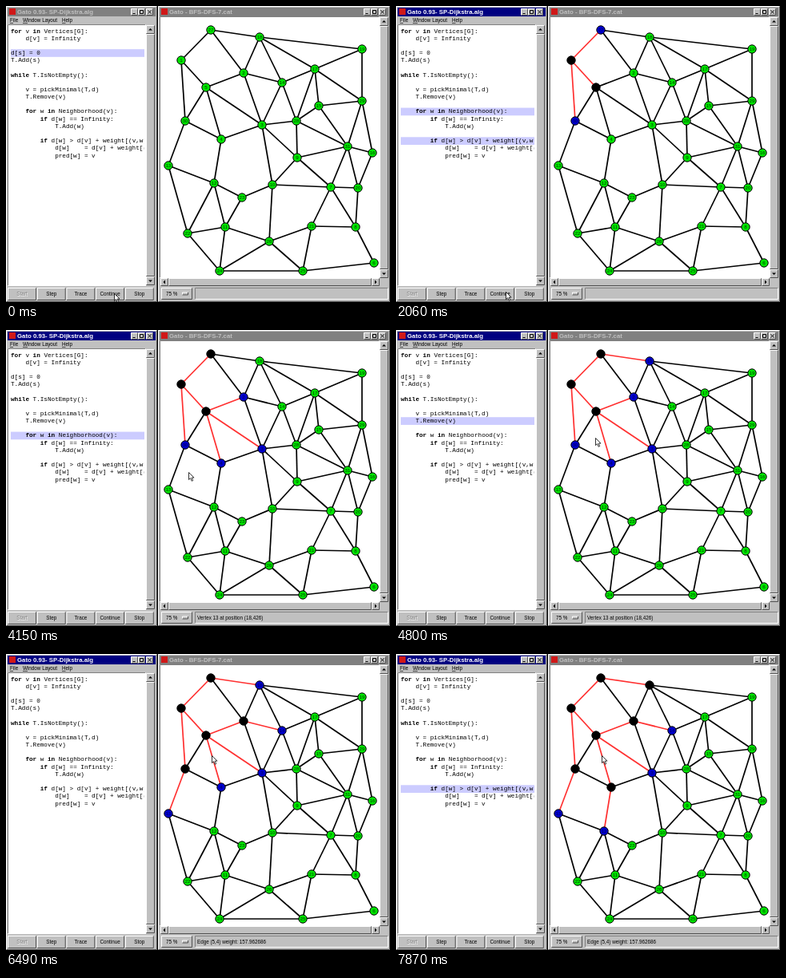
An HTML page for the animation above (8 s loop, 480x371 px).

```html
<!DOCTYPE html>
<html lang="en">
<head>
<meta charset="utf-8">
<title>Shortest paths</title>
<style>
html, body { margin: 0; width: 480px; height: 371px; overflow: hidden; background: #000; }
svg { display: block; }
text { white-space: pre; }
.ui { font: 6.3px "Liberation Sans", Arial, sans-serif; }
.title { font: bold 7.8px "Liberation Sans", Arial, sans-serif; }
.code { font: 7.67px "Liberation Mono", "Courier New", monospace; }
.code tspan { font-weight: bold; }
.label { font: 6.2px "Liberation Sans", Arial, sans-serif; text-anchor: middle; }
.mid { text-anchor: middle; }
</style>
</head>
<body>
<svg id="stage" width="480" height="371" viewBox="0 0 480 371"></svg>
<script>
const LOOP = 8000;
const GRAY = '#c0c0c0', DARK = '#808080', NAVY = '#000080';
const COLORS = {
  green: ['#00e400', '#003c00'],
  blue: ['#0000cd', '#000060'],
  black: ['#000', '#000']
};

const code = [
  'for v in Vertices[G]:',
  '    d[v] = Infinity',
  '',
  'd[s] = 0',
  'T.Add(s)',
  '',
  'while T.IsNotEmpty():',
  '',
  '    v = pickMinimal(T,d)',
  '    T.Remove(v)',
  '',
  '    for w in Neighborhood(v):',
  '        if d[w] == Infinity:',
  '            T.Add(w)',
  '',
  '        if d[w] > d[v] + weight[(v,w)]:',
  '            d[w]    = d[v] + weight[(v,w)]',
  '            pred[w] = v'
];
const lineTop = i => 26.6 + 9.18 * i;

// Vertex positions, numbered from 1
const vertices = [
  [219, 68], [297, 84], [320, 149], [269, 167], [250, 102], [460, 322], [406, 227], [437, 277],
  [364, 190], [333, 224], [274, 277], [260, 222], [203, 200], [345, 96], [391, 125], [458, 184],
  [386, 79], [317, 39], [445, 54], [440, 228], [382, 276], [227, 285], [295, 240], [267, 332],
  [371, 332], [329, 295], [256, 30], [363, 144], [445, 119], [224, 144], [427, 176]
];
const neighbors = {
  1: [5, 30], 2: [5, 14, 3], 3: [28, 4, 9, 10], 4: [12], 5: [30, 3, 4], 7: [20, 21, 8], 8: [6],
  9: [7, 10], 10: [7, 23, 26], 11: [22, 24, 26], 12: [23, 11, 22], 13: [12, 22], 14: [3, 28],
  15: [28, 31], 16: [20], 17: [14, 29, 28, 15], 18: [19, 17, 14, 2], 19: [17, 29], 20: [8],
  21: [8, 25], 22: [24], 23: [11], 24: [25], 25: [6], 26: [21, 24, 25], 27: [18, 1, 2],
  28: [31, 9], 29: [15, 16, 31], 30: [4, 13], 31: [9, 16, 7, 20]
};

// Each step changes only what it names; the rest carries over
const steps = [
  { at: 0, lines: [3], cursor: [135, 360], active: false, status: '' },
  { at: 100, active: true },
  { at: 720, lines: [11], black: 1 },
  { at: 1380, lines: [15], blue: 27, red: '1-27' },
  { at: 1730, lines: [16], blue: 5, red: '1-5' },
  { at: 2060, lines: [11, 15], blue: 30, black: 5, red: '1-30', cursor: [137, 358] },
  { at: 2440, lines: [15], cursor: [150, 345] },
  { at: 2780, blue: 2, red: '2-5', cursor: [163, 316] },
  { at: 3130, lines: [11], blue: 3, red: '3-5', cursor: [173, 284] },
  { at: 3460, lines: [15], cursor: [187, 240] },
  { at: 3770, lines: [11], blue: 4, red: '4-5', cursor: [203, 197],
    status: 'Vertex 13 at position (18,426)' },
  { at: 4150, black: 27, cursor: [228, 178] },
  { at: 4440, lines: [15], blue: 18, red: '18-27', cursor: [243, 155] },
  { at: 4800, lines: [9], cursor: [249, 135] },
  { at: 5140, lines: [15], black: 30, cursor: [255, 130] },
  { at: 5450, lines: [16] },
  { at: 5800, lines: [11], black: 2, blue: 13, red: '13-30' },
  { at: 6160, cursor: [257, 127], status: 'Edge (5,4) weight: 157.962686' },
  { at: 6490, lines: [], blue: 14, red: '2-14' },
  { at: 6830, lines: [15], black: 4 },
  { at: 7140, lines: [13] },
  { at: 7500, lines: [11], black: 18, blue: 12, red: '4-12' },
  { at: 7870, lines: [15] }
];

const rect = (x, y, w, h, fill, extra = '') =>
  `<rect x="${x}" y="${y}" width="${w}" height="${h}" fill="${fill}" ${extra}/>`;
const path = (d, stroke, width = 1, fill = 'none') =>
  `<path d="${d}" stroke="${stroke}" stroke-width="${width}" fill="${fill}"/>`;
const text = (x, y, s, cls = 'ui', fill = '#000', extra = '') =>
  `<text x="${x}" y="${y}" class="${cls}" fill="${fill}" ${extra}>${s}</text>`;

function bevel(x, y, w, h, light = '#fff', dark = '#505050', fill = GRAY) {
  const r = x + w - .5, b = y + h - .5, l = x + .5, t = y + .5;
  return rect(x, y, w, h, fill) +
    path(`M${l} ${b}V${t}H${r}`, light) + path(`M${l} ${b}H${r}V${t}`, dark);
}
const sunken = (x, y, w, h, fill) => bevel(x, y, w, h, DARK, '#fff', fill);

function arrow(cx, cy, dx, dy) {
  const tip = `${cx + dx * 1.5} ${cy + dy * 1.5}`;
  const a = `${cx - dx + dy * 2.5} ${cy - dy + dx * 2.5}`;
  const b = `${cx - dx - dy * 2.5} ${cy - dy - dx * 2.5}`;
  return path(`M${tip}L${a}L${b}Z`, 'none', 0, '#000');
}

function scrollbar(x, y, w, h) {
  const tall = h > w, s = tall ? w : h;
  const ends = tall ? [[x, y, 0, -1], [x, y + h - s, 0, 1]] : [[x, y, -1, 0], [x + w - s, y, 1, 0]];
  const thumb = tall ? bevel(x, y + s, w, h - 2 * s) : bevel(x + s, y, w - 2 * s, h);
  return thumb + ends.map(([ex, ey, dx, dy]) =>
    bevel(ex, ey, s, s) + arrow(ex + s / 2, ey + s / 2, dx, dy)).join('');
}

function titleBar(x, w, label, id) {
  const buttons = [
    [w - 31, 'M2.5 6.5H5.5'], [w - 22, 'M2.5 2.5H6.5V6.5H2.5Z'], [w - 12, 'M2.5 2.5L6.5 6.5M6.5 2.5L2.5 6.5']
  ];
  return rect(x, 2, w, 11, DARK, `id="${id}Bar"`) +
    rect(x + 2, 3, 8, 8, '#d01818') +
    text(x + 12, 10, label, 'title', GRAY, `id="${id}Title"`) +
    buttons.map(([bx, d]) => bevel(x + bx, 3, 9, 9) +
      `<g transform="translate(${x + bx} 3)">${path(d, '#000')}</g>`).join('');
}

function menu(x, label, underline) {
  return text(x, 20, label) + path(`M${x} 21.5h${underline}`, '#000', .6);
}

function button(x, w, label, off) {
  const cx = x + w / 2;
  return bevel(x, 353, w, 16) +
    (off ? text(cx + .7, 363.9, label, 'ui mid', '#fff') : '') +
    text(cx, 363.2, label, 'ui mid', off ? DARK : '#000');
}

function codeLine(s, i) {
  const marked = s.replace(/\b(for|in|while|if)\b/g, '<tspan>$1</tspan>');
  return text(6, lineTop(i) + 6.9, marked, 'code');
}

function codeWindow() {
  const labels = ['Start', 'Step', 'Trace', 'Continue', 'Stop'];
  return bevel(0, 0, 189, 371) + titleBar(2, 185, 'Gato 0.93- SP-Dijkstra.alg', 'code') +
    menu(5, 'File', 4) + menu(21, 'Window Layout', 6) + menu(70, 'Help', 4.5) +
    sunken(2, 23, 173, 328, '#fff') + scrollbar(175, 24, 11, 326) +
    '<g clip-path="url(#page)">' +
    code.map((_, i) => rect(6, lineTop(i), 167, 9.7, '#ccccff', `id="line${i}"`)).join('') +
    code.map(codeLine).join('') + '</g>' +
    labels.map((s, i) => button(2 + i * 36.7, 36, s, i === 0)).join('');
}

function edge(a, b) {
  const [x1, y1] = vertices[a - 1], [x2, y2] = vertices[b - 1];
  const id = `e${Math.min(a, b)}-${Math.max(a, b)}`;
  return `<path id="${id}" d="M${x1} ${y1}L${x2} ${y2}" stroke-width="1.7"/>`;
}

function vertex([x, y], i) {
  return `<g id="v${i + 1}"><circle cx="${x}" cy="${y}" r="5.2" stroke="#000" stroke-width="1"/>` +
    text(x, y + 2.2, i + 1, 'label') + '</g>';
}

function graphWindow() {
  const edges = Object.entries(neighbors).flatMap(([a, list]) => list.map(b => edge(+a, b)));
  return bevel(190, 0, 290, 371) + titleBar(192, 286, 'Gato - BFS-DFS-7.cat', 'graph') +
    sunken(192, 13, 275, 328, '#fff') + scrollbar(467, 14, 11, 327) + scrollbar(193, 341, 274, 10) +
    bevel(194, 353, 39, 15) + text(200, 362.6, '75 %') + bevel(220, 358.5, 8, 4) +
    sunken(236, 353, 242, 15, GRAY) + text(239, 362.6, '', 'ui', '#000', 'id="status"') +
    edges.join('') + vertices.map(vertex).join('');
}

const stage = document.getElementById('stage');
stage.innerHTML = '<clipPath id="page"><rect x="3" y="24" width="170" height="326"/></clipPath>' +
  codeWindow() + graphWindow() +
  `<g id="cursor">${path('M.5 .5V9.6L2.6 7.7L4.2 11.3L5.7 10.6L4.2 7.1H7Z', '#000', .8, '#fff')}</g>`;

const $ = id => document.getElementById(id);

function stateAt(t) {
  const state = { colors: {}, red: new Set() };
  for (const { red, blue, black, ...rest } of steps.filter(s => s.at <= t)) {
    Object.assign(state, rest);
    if (red) state.red.add('e' + red);
    if (blue) state.colors[blue] = 'blue';
    if (black) state.colors[black] = 'black';
  }
  return state;
}

function draw(state) {
  code.forEach((_, i) => $('line' + i).setAttribute('visibility', state.lines.includes(i) ? 'visible' : 'hidden'));
  vertices.forEach((_, i) => {
    const [fill, ink] = COLORS[state.colors[i + 1] || 'green'];
    const [disc, label] = $('v' + (i + 1)).children;
    disc.setAttribute('fill', fill);
    label.setAttribute('fill', ink);
  });
  stage.querySelectorAll('path[id^=e]').forEach(p =>
    p.setAttribute('stroke', state.red.has(p.id) ? '#ff3030' : '#000'));
  $('codeBar').setAttribute('fill', state.active ? NAVY : DARK);
  $('codeTitle').setAttribute('fill', state.active ? '#fff' : GRAY);
  $('status').textContent = state.status;
  $('cursor').setAttribute('transform', `translate(${state.cursor})`);
}

let shown = -1;
function tick() {
  const state = stateAt(performance.now() % LOOP);
  if (state.at !== shown) draw(state);
  shown = state.at;
  requestAnimationFrame(tick);
}
tick();
</script>
</body>
</html>
```
